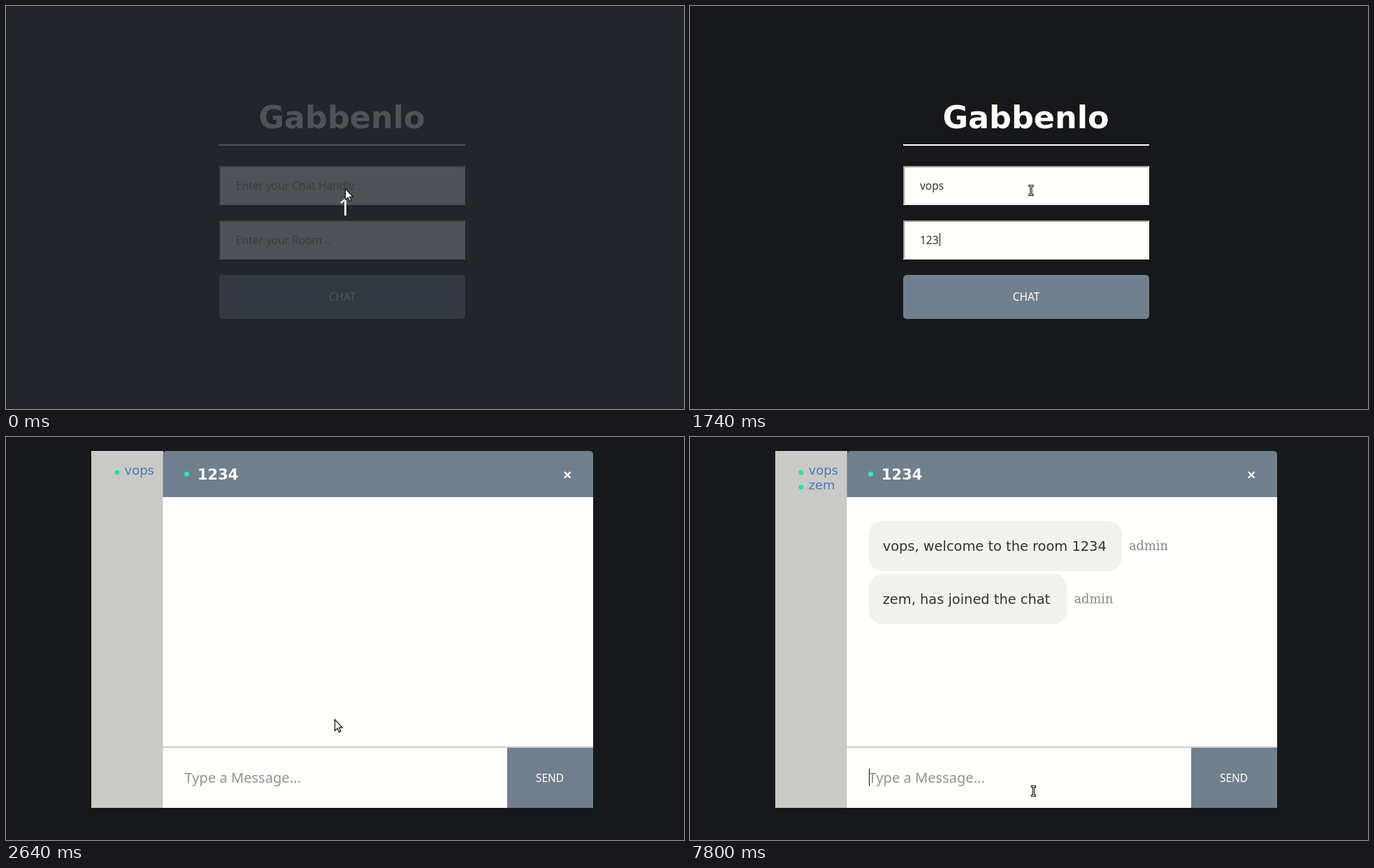
Recreate the animation shown at these times as an HTML page. Size 970 px wide and 577 px high, loop 8 s.

```html
<!DOCTYPE html>
<html lang="en">
<head>
<meta charset="utf-8">
<title>Chat room</title>
<style>
  html, body { margin: 0; width: 100%; height: 100%; overflow: hidden; background: #17181b; }
  svg { display: block; width: 100%; height: 100%; }
  text { font: 15.5px "Noto Sans", sans-serif; fill: #333; white-space: pre; }
  .title { font: bold 44.5px "DejaVu Sans", sans-serif; fill: #fffffb; text-anchor: middle; }
  .label { fill: #fffffb; text-anchor: middle; }
  .hint { fill: #919191; }
  .prompt { font-size: 20.1px; fill: #919191; }
  .room { font: bold 21px "DejaVu Sans", sans-serif; fill: #fffffb; }
  .user { font: 18px "DejaVu Sans", sans-serif; fill: #4f77c4; }
  .message { font: 19.4px "DejaVu Sans", sans-serif; }
  .sender { font: 17.8px "DejaVu Serif", serif; fill: #858585; }
  .count { font-size: 32px; fill: #fffffb; }
  .paper { fill: #fffffb; }
  .slate { fill: #707f8d; }
  .online { fill: #05ef92; }
  .bubble { fill: #f1f2ee; }
</style>
</head>
<body>
<svg viewBox="0 0 970 577">
  <rect width="970" height="577" fill="#17181b"/>

  <g id="login">
    <text class="title" x="480.5" y="175">Gabbenlo</text>
    <rect class="paper" x="305" y="198" width="352" height="2"/>
    <g id="fields"></g>
    <rect class="slate" x="305" y="385" width="352" height="63" rx="5"/>
    <text class="label" x="481" y="422">CHAT</text>
    <rect id="focus" x="325.5" y="407.5" width="311" height="18" fill="none" stroke="#fffffb" stroke-dasharray="1 1"/>
    <rect id="loginCaret" width="1" height="19" fill="#111"/>
  </g>

  <g id="chat">
    <rect x="122" y="20" width="103" height="511" fill="#c9c9c5"/>
    <rect class="paper" x="224.5" y="80" width="615.5" height="451"/>
    <path class="slate" d="M224.5 86V25a5 5 0 0 1 5-5H835a5 5 0 0 1 5 5V86Z"/>
    <circle cx="258.5" cy="53" r="3.5" fill="#1df5ae"/>
    <text class="room" x="274" y="61">1234</text>
    <path d="M799 50l8.5 8.5m0-8.5l-8.5 8.5" stroke="#fffffb" stroke-width="2.4"/>
    <circle class="online" cx="159" cy="50.7" r="3.3"/>
    <text class="user" x="169.5" y="54">vops</text>
    <rect x="224.5" y="443" width="615.5" height="2" fill="#ccccca"/>
    <text class="prompt" x="255.5" y="495">Type a Message...</text>
    <rect class="slate" x="717" y="445" width="123" height="86"/>
    <text class="label" x="778" y="494">SEND</text>
    <g id="joined">
      <circle class="online" cx="159" cy="72" r="3.3"/>
      <text class="user" x="169.5" y="75">zem</text>
      <rect class="bubble" x="255.5" y="120" width="362.5" height="72" rx="20"/>
      <text class="message" x="275.7" y="163">vops, welcome to the room 1234</text>
      <text class="sender" x="628" y="162">admin</text>
      <rect class="bubble" x="255.5" y="196" width="284" height="72" rx="20"/>
      <text class="message" x="275.7" y="239">zem, has joined the chat</text>
      <text class="sender" x="549.5" y="238">admin</text>
    </g>
    <rect id="chatCaret" x="256" y="475" width="1" height="25" fill="#111"/>
  </g>

  <g id="countdown">
    <rect width="970" height="577" fill="#262930" opacity=".806"/>
    <text class="count" x="475.5" y="300">1</text>
  </g>

  <g id="arrow">
    <path d="M.5 .5V16.5L4.2 13.2 6.6 18.6 9 17.5 6.6 12.2H11.3Z" fill="#fff" stroke="#111" stroke-width="1.2"/>
  </g>
  <g id="beam" fill="none" stroke-linecap="square">
    <path d="M-2-6.5H2M0-6.5V6.5M-2 6.5H2" stroke="#111" stroke-width="3.2"/>
    <path d="M-2-6.5H2M0-6.5V6.5M-2 6.5H2" stroke="#fff" stroke-width="1"/>
  </g>
</svg>
<script>
const LOOP = 8000;
const $ = id => document.getElementById(id);
const show = (id, on) => { $(id).style.display = on ? "" : "none"; };

const HANDLE = { id: "handle", top: 229, hint: "Enter your Chat Handle .." };
const ROOM = { id: "room", top: 307, hint: "Enter your Room .." };

// Input boxes with an inset border.
$("fields").innerHTML = [HANDLE, ROOM].map(({ id, top }) => `
  <rect class="paper" x="305" y="${top}" width="352" height="56"/>
  <path d="M305 ${top}h352l-2 2h-348v52l-2 2z" fill="#9a9a98"/>
  <path d="M657 ${top}v56h-352l2-2h348v-52z" fill="#eeeeea"/>
  <text id="${id}" x="329" y="${top + 34}"></text>`).join("");

// [time, handle, room, field with the caret]
const typing = [
  [0, "", "", null],
  [720, "v", "", HANDLE],
  [840, "vo", "", HANDLE],
  [960, "vop", "", HANDLE],
  [1080, "vops", "", HANDLE],
  [1140, "vops", "", ROOM],
  [1440, "vops", "1", ROOM],
  [1620, "vops", "12", ROOM],
  [1740, "vops", "123", ROOM],
  [1860, "vops", "1234", ROOM],
  [2520, "vops", "1234", null]
];

// [time, pointer shape, x, y]
const pointer = [
  [0, "arrow", 485, 261],
  [300, "beam", 488, 264],
  [2160, "beam", 487, 274],
  [2220, "arrow", 484, 298],
  [2280, "beam", 480, 328],
  [2340, "beam", 476, 356],
  [2400, "arrow", 472, 386],
  [2460, "arrow", 470, 402],
  [2520, "arrow", 470, 404],
  [5760, "arrow", 470, 424],
  [5820, "beam", 475, 456],
  [5880, "beam", 482, 484],
  [5940, "beam", 489, 502],
  [6000, "beam", 491.5, 507]
];

const stepAt = (steps, time) => steps.findLast(([start]) => start <= time);

function fill(field, value) {
  const text = $(field.id);
  text.textContent = value || field.hint;
  text.setAttribute("class", value ? "" : "hint");
}

function placeCaret(field, value) {
  show("loginCaret", field);
  if (!field) return;
  const offset = value ? $(field.id).getComputedTextLength() + 1.2 : 0;
  $("loginCaret").setAttribute("x", Math.round(329 + offset));
  $("loginCaret").setAttribute("y", field.top + 18);
}

function render(time) {
  const inChat = time >= 2640;
  show("login", !inChat);
  show("chat", inChat);
  show("countdown", time < 300);
  show("focus", time >= 2520);
  show("joined", time >= 7500);
  show("chatCaret", time >= 7800);

  if (!inChat) {
    const [, handle, room, active] = stepAt(typing, time);
    fill(HANDLE, handle);
    fill(ROOM, room);
    placeCaret(active, active === HANDLE ? handle : room);
  }

  const [, shape, x, y] = stepAt(pointer, time);
  show("arrow", shape === "arrow");
  show("beam", shape === "beam");
  $(shape).setAttribute("transform", `translate(${x} ${y})`);
}

function tick() {
  render(performance.now() % LOOP);
  requestAnimationFrame(tick);
}
tick();
</script>
</body>
</html>
```
